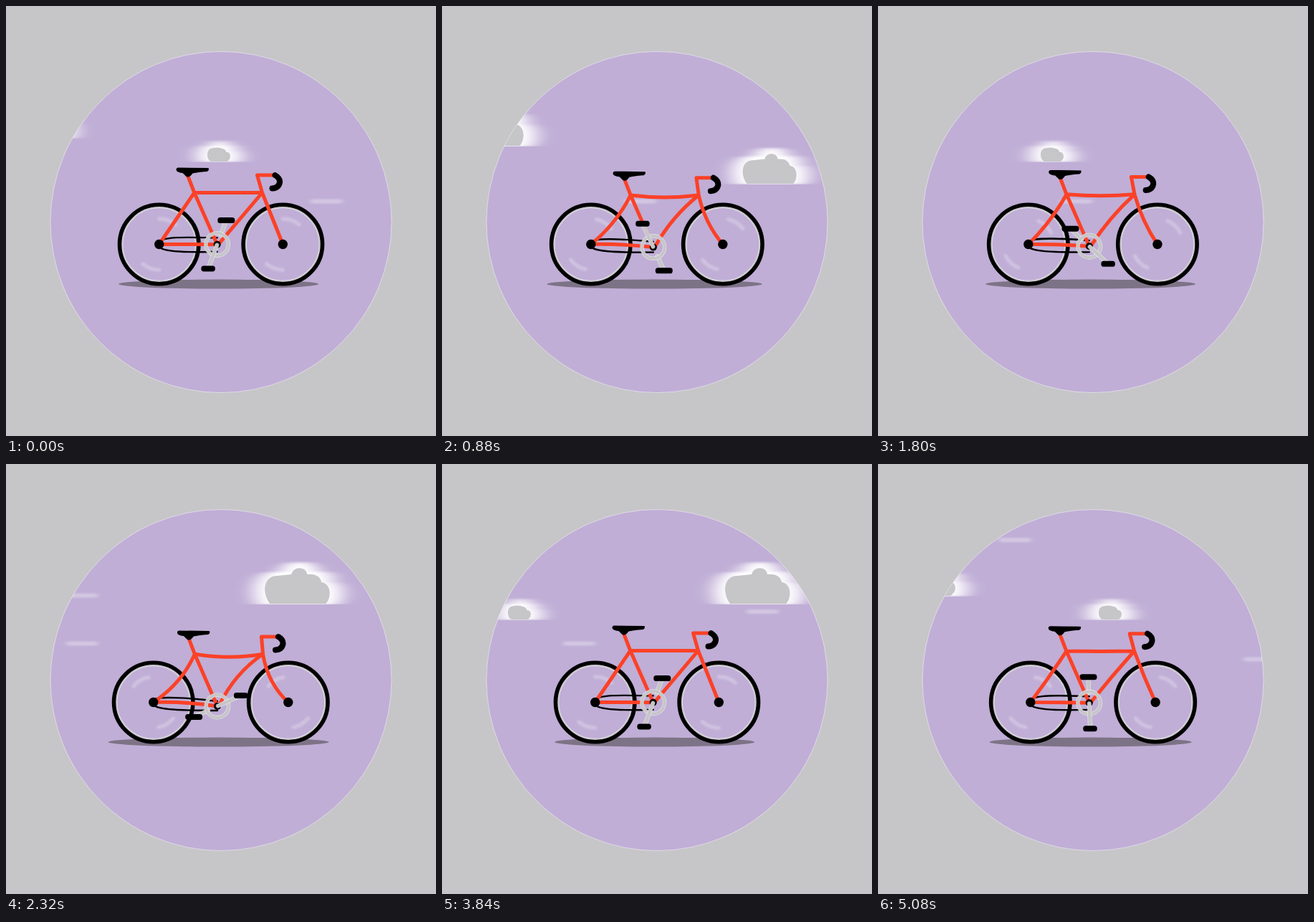
These frames come from a looping animation (600 by 600 pixels, 5.12 s). An HTML page:

```html
<!DOCTYPE html>
<html lang="en">
<head>
<meta charset="utf-8">
<title>Bicycle</title>
<style>
  html, body { margin: 0; width: 100%; height: 100%; overflow: hidden; background: #c6c6c8; }
  svg { display: block; width: 100vw; height: 100vh; }
  .line { fill: none; stroke-linecap: round; stroke-linejoin: round; }
  .red { stroke: #fb4127; stroke-width: 5; }
  .black { stroke: #000; }
  .fringe { stroke: #fff; stroke-opacity: .65; }
  .grey { stroke: #c6c6c8; }
</style>
</head>
<body>
<svg viewBox="0 0 600 600">
  <defs>
    <clipPath id="disc"><circle cx="300" cy="301.5" r="238"/></clipPath>
    <clipPath id="ground"><rect x="-150" y="-90" width="300" height="91"/></clipPath>
    <filter id="glow" x="-60%" y="-20%" width="220%" height="140%"><feGaussianBlur stdDeviation="13 .8"/></filter>
    <filter id="soft" x="-30%" y="-80%" width="160%" height="260%"><feGaussianBlur stdDeviation="3 .8"/></filter>
    <filter id="shine" x="-30%" y="-30%" width="160%" height="160%"><feGaussianBlur stdDeviation="1.1"/></filter>
  </defs>
  <circle cx="300" cy="301.5" r="238" fill="#c0aed6" stroke="#fff" stroke-opacity=".6" stroke-width=".8"/>
  <g id="sky" clip-path="url(#disc)"></g>
  <g id="bike" transform="translate(.5 .5)"></g>
</svg>
<script>
const STEP = 40, COUNT = 128;
const NS = 'http://www.w3.org/2000/svg';
const sky = document.getElementById('sky');
const bike = document.getElementById('bike');

function set(el, attrs) {
  for (const key in attrs) el.setAttribute(key, attrs[key]);
  return el;
}
function add(parent, tag, attrs) {
  return parent.appendChild(set(document.createElementNS(NS, tag), attrs));
}
const line = (parent, cls, width) =>
  add(parent, 'path', { class: 'line ' + cls, ...(width && { 'stroke-width': width }) });
const mod = (a, b) => ((a % b) + b) % b;

// Sky: each item passes three times per loop, at these offsets.
const PASSES = [0, 46, 85];
const LANES = [
  [97, 21], [105.5, 38], [183, 30], [183, 53], [205.5, 26], [205.5, 49],
  [250, 7], [250, 30], [272, 19], [272, 42]
];
const GLOW = 'M-55 1C-68-18 -56-43 -36-44L-24-45C-19-62 24-64 30-45C44-46 52-40 50-30C64-30 68-8 56 1Z';
const BUMPY = 'M-38 0C-49-14 -48-39 -28-39L-8-41C-6-52 12-53 14-41C26-42 32-38 34-30C48-28 48-8 40 0Z';
const FLAT = 'M-18 0C-31-2 -32-27 -17-28C-8-30 0-30 6-28C13-27 17-25 18-20C30-21 30-6 24-3C23 0 20 0 18 0Z';
const CLOUDS = [
  { x: 372.5, y: 195, at: 13, v: 33.8, size: 1, core: BUMPY, fit: '1' },
  { x: 195, y: 248, at: 32, v: 26.2, size: .865, core: BUMPY, fit: '.83 .84' },
  { x: 351, y: 184, at: 32, v: 27.1, size: .7, core: FLAT, fit: '1' },
  { x: 297, y: 217, at: 43, v: 27, size: .5, core: FLAT, fit: '.57 .66' }
];

const streaks = LANES.flatMap(([y, at]) => PASSES.map(pass => ({
  at: at + pass,
  el: add(sky, 'rect', { y: y - 2.6, width: 45, height: 6, rx: 3, fill: '#fff',
    'fill-opacity': .3, filter: 'url(#soft)' })
})));
const clouds = CLOUDS.flatMap(c => PASSES.map(pass => {
  const el = add(sky, 'g', {});
  const clip = add(el, 'g', { 'clip-path': 'url(#ground)' });
  const blur = add(clip, 'g', { filter: 'url(#glow)' });
  add(blur, 'path', { d: GLOW, fill: '#fff', transform: `scale(${c.size})` });
  add(el, 'path', { d: c.core, fill: '#c6c6c8', transform: `scale(${c.fit})` });
  return { ...c, at: c.at + pass, el };
}));

function drawSky(n) {
  for (const s of streaks) {
    const age = mod(n - s.at, COUNT);
    set(s.el, { x: 510 - 85.3 * age, display: age < 7 ? 'inline' : 'none' });
  }
  for (const c of clouds) {
    const age = mod(n - c.at + COUNT / 2, COUNT) - COUNT / 2;
    const x = c.x - c.v * age;
    set(c.el, { transform: `translate(${x} ${c.y})`, display: x > -120 && x < 720 ? 'inline' : 'none' });
  }
}

// Bicycle
const shadow = add(bike, 'ellipse', { cx: 296.1, cy: 387.6, ry: 6.5, fill: '#7d7386' });

function wheel() {
  const el = add(bike, 'g', {});
  const ring = (cls, r, width) => add(el, 'circle', { class: 'line ' + cls, r, 'stroke-width': width });
  ring('fringe', 51.6, 2.6);
  ring('grey', 51.6, 1.5);
  ring('black', 55.2, 5.6);
  const shine = add(el, 'g', { filter: 'url(#shine)' });
  for (const turn of [0, 180])
    add(shine, 'path', { d: 'M-12-33.5Q0-38 12-33.5', class: 'line', stroke: '#fff',
      'stroke-opacity': .24, 'stroke-width': 5.5, transform: `rotate(${turn})` });
  return { el, shine };
}
function crank(width) {
  const el = add(bike, 'g', {});
  return {
    edge: line(el, 'fringe', 6),
    arm: line(el, 'grey', 4.8),
    pedal: add(el, 'rect', { width, height: 8, rx: 3.6 }),
    width
  };
}

const rear = wheel(), front = wheel();
const chain = line(bike, 'black', 2.4);
const far = crank(24);
const frame = line(bike, 'red');
const bar = line(bike, 'black', 8);
const seat = add(bike, 'path', {
  d: 'M240 225Q236 225.500 237.500 229.500Q240 232 246 232.500L250 236.500Q253 239.500 257 236.500L260 233Q272 230.500 280 230.500Q283.500 229 282 225.500Z'
});
const hubs = [0, 1].map(() => add(bike, 'circle', { r: 6.7, cy: 332 }));
const ringSet = add(bike, 'g', {});
add(ringSet, 'circle', { class: 'line fringe', r: 15.8, 'stroke-width': 5.4 });
add(ringSet, 'circle', { class: 'line grey', r: 15.8, 'stroke-width': 4.2 });
add(ringSet, 'circle', { r: 5 });
const near = crank(19.5);

function turnCrank(c, x, y, angle, from) {
  const dx = Math.sin(angle), dy = -Math.cos(angle);
  const d = `M${x + dx * from} ${y + dy * from}L${x + dx * 33} ${y + dy * 33}`;
  set(c.edge, { d });
  set(c.arm, { d });
  set(c.pedal, { x: x + dx * 36 - c.width / 2, y: y + dy * 36 - 4 });
}

function drawBike(n) {
  const w = n / 16 * 2 * Math.PI;
  const k = .54 * (1 - Math.cos(w - .35)) - .033;
  const mix = (a, b) => a + (b - a) * k;
  const pt = (x, y, dx, dy) => [x + dx * k, y + dy * k];
  // Tube from a to b whose middle bends by (bx, by) when the frame is loaded.
  const tube = (a, b, bx, by) =>
    `M${a}Q${(a[0] + b[0]) / 2 + bx * k} ${(a[1] + b[1]) / 2 + by * k} ${b}`;

  const hubR = pt(213.2, 332, -8, 0), hubF = pt(385.8, 332, 7.5, 0);
  const axle = pt(294.2, 332.2, .2, 5.3), foot = [axle[0] + 2.5, axle[1] - 1];
  const joint = pt(262.3, 260, .5, 4.7), head = pt(357, 260, 1, 4.8);
  const post = pt(253, 236, 1.5, 7), stem = pt(350, 235.6, 6, 5);
  const grip = pt(374, 235.6, 4.5, 5);

  set(shadow, { rx: mix(139.5, 154) });
  const sway = 14.6 - 8.5 * Math.cos(2 * w) - 31.7 * Math.sin(2 * w) + 13.9 * Math.cos(4 * w);
  [[rear, hubR], [front, hubF]].forEach(([part, hub], i) => {
    set(part.el, { transform: `translate(${hub})` });
    set(part.shine, { transform: `rotate(${sway})` });
    set(hubs[i], { cx: hub[0] });
  });

  const [hx] = hubR, [ax, ay] = axle;
  set(chain, {
    d: `M${ax} ${ay - mix(9.3, 7)}C${ax - 30} ${ay - mix(9.5, 11)} ${hx + 8} ${mix(320, 323)} ${hx + 2} 328` +
       `V337C${hx + 10} 343 ${ax - 40} 343.500 ${ax} ${ay + mix(10, 6)}`
  });
  set(frame, {
    d: tube(joint, head, 0, 8) + tube(hubR, joint, 11, 7) + tube(hubR, axle, 0, -4) +
       tube(head, foot, -9, -9) + tube(head, hubF, -11, 7) +
       `M${post}L${joint}L${axle}M${grip}L${stem}L${head}`
  });
  set(bar, { d: `M${grip[0] + 1} ${grip[1]}q7 4 6.500 10q-1.500 8 -10.500 8.500` });
  set(seat, { transform: `translate(${1.4 * k} ${7 * k})` });
  set(ringSet, { transform: `translate(${axle})` });

  const angle = (22.5 * n + 20.5) * Math.PI / 180;
  turnCrank(far, ax, ay, angle, 14);
  turnCrank(near, ax, ay, angle + Math.PI, 1);
}

const start = performance.now();
function tick() {
  const n = Math.floor((performance.now() - start) / STEP) % COUNT;
  drawSky(n);
  drawBike(n);
  requestAnimationFrame(tick);
}
tick();
</script>
</body>
</html>
```
